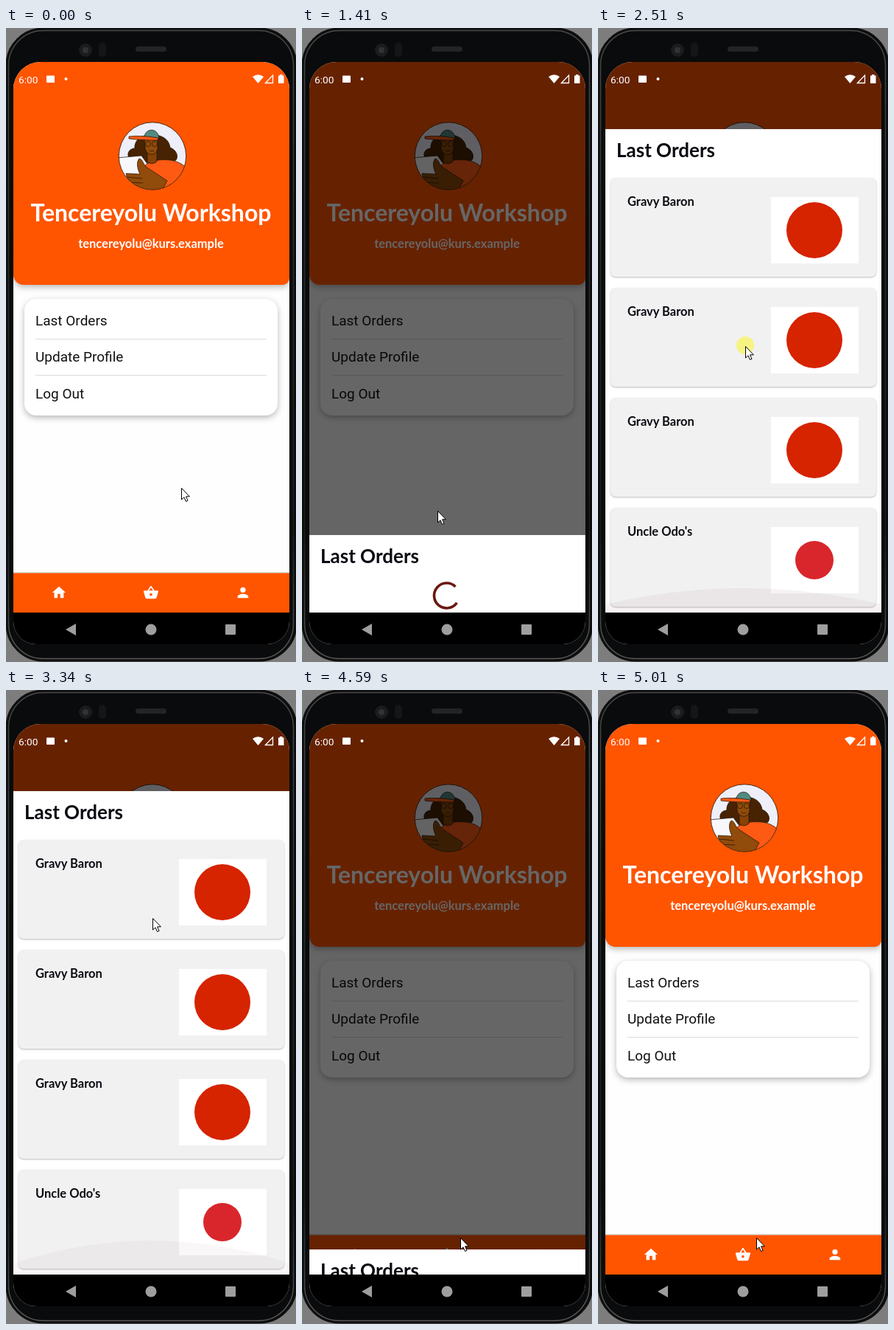
These frames come from a looping animation (394 px wide and 859 px high, 5.74 s). An HTML page:

```html
<!DOCTYPE html>
<html lang="en">
<head>
<meta charset="utf-8">
<title>Profile and last orders</title>
<style>
  html, body { margin: 0; width: 100%; height: 100%; overflow: hidden; background: #7d7d7d; }
  svg { display: block; }
  .head { font-family: Lato, "Open Sans", sans-serif; font-weight: 700; }
  .row { font-family: Roboto, Arial, sans-serif; font-size: 19px; fill: #111; }
  .card { filter: drop-shadow(0 3px 4px rgba(0, 0, 0, .28)); }
  .order { filter: drop-shadow(0 1px 1px rgba(0, 0, 0, .28)); }
</style>
</head>
<body>
<svg width="394" height="859" viewBox="0 0 394 859">
  <defs>
    <clipPath id="screenClip">
      <path d="M10 83a37 37 0 0 1 37-37H348a37 37 0 0 1 37 37V804a31 31 0 0 1-31 31H41a31 31 0 0 1-31-31z"/>
    </clipPath>
    <clipPath id="windowClip"><rect x="10" y="46" width="375" height="746"/></clipPath>
    <clipPath id="avatarClip"><circle cx="199" cy="173.5" r="45.5"/></clipPath>
    <linearGradient id="rim" x2="0" y2="1">
      <stop offset="0" stop-color="#4a4a4a"/>
      <stop offset=".4" stop-color="#2c2c2c"/>
      <stop offset=".8" stop-color="#1c1c1c"/>
      <stop offset="1" stop-color="#5a5a5a"/>
    </linearGradient>
  </defs>

  <!-- phone body -->
  <rect x=".5" y=".5" width="394" height="857" rx="50" fill="#0a0b0c" stroke="#111" stroke-width="2"/>
  <rect x="3.5" y="3.5" width="387" height="851" rx="47" fill="none" stroke="url(#rim)" stroke-width="1.500"/>
  <circle cx="108" cy="30" r="9" fill="#1b1c1d"/>
  <circle cx="108" cy="30" r="4" fill="#303236"/>
  <rect x="126" y="20" width="10" height="19" rx="5" fill="#151617"/>
  <rect x="176" y="25" width="42" height="7" rx="3.5" fill="#232425"/>

  <g clip-path="url(#screenClip)">
    <rect x="10" y="46" width="375" height="789" fill="#fefefe"/>

    <!-- profile header -->
    <path class="card" d="M10 46H385V339a9 9 0 0 1-9 9H24a14 14 0 0 1-14-14z" fill="#ff5500"/>
    <g clip-path="url(#avatarClip)" stroke="#1d1208" stroke-width=".7">
      <rect x="150" y="125" width="98" height="98" fill="#eeeff8"/>
      <path d="M168 178C162 168 170 163 175 163C174 152 184 144 198 145C213 144 222 152 223 162C231 165 235 173 231 179C218 184 180 184 168 178Z" fill="#472203"/>
      <path d="M150 176L184 173L192 184L172 222H150Z" fill="#f8f8fc"/>
      <path d="M188 187C197 178 213 178 224 179C235 181 243 186 247 193V212L205 224Z" fill="#ff5a14"/>
      <path d="M192 168V182Q199 186 205 181V166Z" fill="#874206"/>
      <path d="M188 149H206V163C205 174 191 174 189 163Z" fill="#914b0a"/>
      <g fill="none"><circle cx="193" cy="157" r="3.6"/><circle cx="202" cy="157" r="3.6"/><path d="M195 166Q198 168 201 166"/></g>
      <path d="M188 149C188 135 207 134 208 150Z" fill="#518b80"/>
      <path d="M167 147Q184 145 207 149L206 152Q183 152 167 150Z" fill="#ff5a14"/>
      <path d="M163 197L182 198C178 190 177 181 181 177C186 177 186 186 193 190L219 207L211 222H190L166 214L164 209L168 207L164 202Z" fill="#914b0a"/>
      <path d="M165 202L185 204M166 209L186 210" fill="none"/>
    </g>
    <circle cx="199" cy="173.5" r="45.7" fill="none" stroke="#2b1608" stroke-width=".8"/>
    <g class="head" fill="#fff" text-anchor="middle">
      <text x="197" y="262" font-size="32">Tencereyolu Workshop</text>
      <text x="197" y="297.500" font-size="16.500">tencereyolu@kurs.example</text>
    </g>

    <!-- menu -->
    <rect class="card" x="25" y="367" width="344" height="158" rx="16" fill="#fff"/>
    <path d="M40 421.5H354M40 470.5H354" stroke="#dcdcdc"/>
    <g class="row">
      <text x="40" y="403">Last Orders</text>
      <text x="40" y="452">Update Profile</text>
      <text x="40" y="501.500">Log Out</text>
    </g>

    <!-- bottom tabs -->
    <rect x="10" y="737" width="375" height="2" fill="#dedede"/>
    <rect x="10" y="738.5" width="375" height="54" fill="#ff5500"/>
    <g fill="#fff">
      <path transform="translate(61 754) scale(.912)" d="M10 20v-6h4v6h5v-8h3L12 3 2 12h3v8z"/>
      <path transform="translate(186 754) scale(.912)" fill-rule="evenodd" d="M17.2 9L12.800 2.400Q12 1.600 11.200 2.400L6.800 9H2Q1 9 1 10.300L3.600 19.500Q4 21 5.500 21H18.500Q20 21 20.400 19.500L23 10.300Q23 9 22 9ZM9 9L12 4.600L15 9ZM12 17a2 2 0 1 1 0-4a2 2 0 1 1 0 4Z"/>
      <path transform="translate(311 754) scale(.912)" d="M12 12a4 4 0 1 0 0-8a4 4 0 1 0 0 8zm0 2c-2.700 0-8 1.300-8 4v2h16v-2c0-2.700-5.300-4-8-4z"/>
    </g>

    <rect id="dim" x="10" y="46" width="375" height="746"/>

    <!-- system bars -->
    <rect x="10" y="792" width="375" height="43"/>
    <g fill="#9e9e9e">
      <path d="M81 815L95 807V823Z"/>
      <circle cx="197" cy="815" r="7.500"/>
      <rect x="298" y="808" width="14" height="14" rx="1"/>
    </g>
    <g fill="#fff">
      <text x="17" y="74.500" font-family="Roboto, Arial, sans-serif" font-size="13.700">6:00</text>
      <rect x="55" y="64.500" width="11" height="9.500" rx="1"/>
      <circle cx="81.500" cy="69" r="2"/>
      <path d="M335 66Q342.500 60.500 350 66L342.500 75Z"/>
      <path d="M352.500 74.500L362.500 64V74.500Z" fill="none" stroke="#fff" stroke-width="1.300"/>
      <path d="M370 64.500H372V63H375.500V64.500H377.500V75H370Z"/>
    </g>

    <!-- bottom sheet window -->
    <g id="window">
      <g clip-path="url(#windowClip)">
        <g id="sheet">
          <rect x="10" width="375" height="800" fill="#fff"/>
          <text class="head" x="25" y="38" font-size="26" fill="#0b0a12">Last Orders</text>
          <path id="spinner" fill="none" stroke="#6a1810" stroke-width="3.600"/>
          <g id="list"></g>
        </g>
        <path id="glow" fill="#6b1830"/>
      </g>
    </g>
  </g>

  <g id="pointer">
    <circle id="press" cy="-1" r="12" fill="#f7f27c" fill-opacity=".95"/>
    <path d="M.5.500V16L4 12.800L6.500 18.500L9 17.400L6.600 11.800H11.400Z" fill="#fff" stroke="#000"/>
  </g>
</svg>
<script>
const LOOP = 5740, STEP = 70;
const BURSTS = [0, 700, 1340, 2230, 2860, 3210, 3960, 4590];
const LIST_READY = 1690;
const $ = id => document.getElementById(id);
const clamp = v => Math.max(0, Math.min(1, v));
const between = (t, a, b) => t >= a && t < b;
const smooth = u => u * u * (3 - 2 * u);

// Value of column `col` in keys of the form [time, value, ...].
function track(t, keys, col = 1, ease = u => u) {
  if (t <= keys[0][0]) return keys[0][col];
  for (let i = 1; i < keys.length; i++) {
    const a = keys[i - 1], b = keys[i];
    if (t < b[0]) return a[col] + (b[col] - a[col]) * ease((t - a[0]) / (b[0] - a[0]));
  }
  return keys[keys.length - 1][col];
}

const approach = [[0, 238, 623], [630, 109, 402]];
const path = [
  [840, 109, 402], [980, 128, 441], [1410, 184, 654], [1760, 192, 680],
  [2230, 192, 680], [2510, 200, 431], [2650, 200, 349], [2790, 199, 316], [3070, 199, 309],
  [3960, 199, 309], [4100, 195, 447], [4380, 213, 700], [4520, 215, 742]
];
const sheetTop = [
  [2230, 315], [2300, 292], [2510, 137], [3960, 137], [4030, 162],
  [4100, 226], [4380, 580], [4590, 758], [4660, 792]
];
const dimming = [[910, 0], [980, .2], [1120, .6], [4660, .6], [4870, 0]];
const arcTail = [[980, -60], [1410, 35], [1690, 280]];
const arcHead = [[980, 15], [1410, 315], [1690, 375]];
const glowRise = [[2440, 0], [2510, 33], [2790, 46]];
const glowAlpha = [[2440, 0], [2510, .05], [3210, .05], [3400, 0]];

const orders = [
  ["Gravy Baron", "#d62300", 38], ["Gravy Baron", "#d62300", 38],
  ["Gravy Baron", "#d62300", 38], ["Uncle Odo's", "#d8262c", 26]
];
$("list").innerHTML = orders.map(([name, color, r], i) => `
  <g transform="translate(0 ${66 + i * 149})">
    <rect class="order" x="17" width="361" height="134" rx="7" fill="#f1f1f1"/>
    <text class="head" x="40" y="38" font-size="16.500" fill="#0b0a12">${name}</text>
    <rect x="235" y="26" width="119" height="90" fill="#fff"/>
    <circle cx="294" cy="71" r="${r}" fill="${color}"/>
  </g>`).join("");

function arc(cx, cy, r, from, to) {
  const at = deg => {
    const a = deg * Math.PI / 180;
    return `${cx + r * Math.cos(a)} ${cy + r * Math.sin(a)}`;
  };
  return `M${at(from)}A${r} ${r} 0 ${to - from > 180 ? 1 : 0} 1 ${at(to)}`;
}

function snap(t) {
  const start = BURSTS.filter(b => b <= t).pop();
  return start + Math.floor((t - start) / STEP) * STEP;
}

function draw(t) {
  const ready = t >= LIST_READY;
  const remaining = (1 - clamp((t - 910) / 146)) ** 2;
  const open = between(t, 911, 4661);

  $("dim").setAttribute("fill-opacity", track(t, dimming));
  $("window").setAttribute("transform", `translate(0 ${160 * remaining})`);
  $("window").setAttribute("opacity", open ? 1 - remaining : 0);
  $("sheet").setAttribute("transform", `translate(0 ${ready ? track(t, sheetTop) : 687})`);
  $("list").setAttribute("visibility", ready ? "visible" : "hidden");
  $("spinner").setAttribute("visibility", ready ? "hidden" : "visible");
  $("spinner").setAttribute("d", arc(196.5, 82, 17, track(t, arcTail), track(t, arcHead)));

  const rise = track(t, glowRise), edge = 792 - rise / 3;
  $("glow").setAttribute("d", `M10 792V${edge}Q197.5 ${edge - rise * 4 / 3} 385 ${edge}V792Z`);
  $("glow").setAttribute("fill-opacity", track(t, glowAlpha));

  const [x, y] = t < 630
    ? [1, 2].map(c => track(t, approach, c, smooth))
    : [1, 2].map(c => track(t, path, c));
  $("pointer").setAttribute("transform", `translate(${Math.round(x)} ${Math.round(y)})`);
  const pressed = between(t, 630, 770) || between(t, 2230, 3210) || between(t, 3960, 4380);
  $("press").setAttribute("visibility", pressed ? "visible" : "hidden");
}

const began = performance.now();
function tick() {
  draw(snap((performance.now() - began) % LOOP));
  requestAnimationFrame(tick);
}
tick();
</script>
</body>
</html>
```
